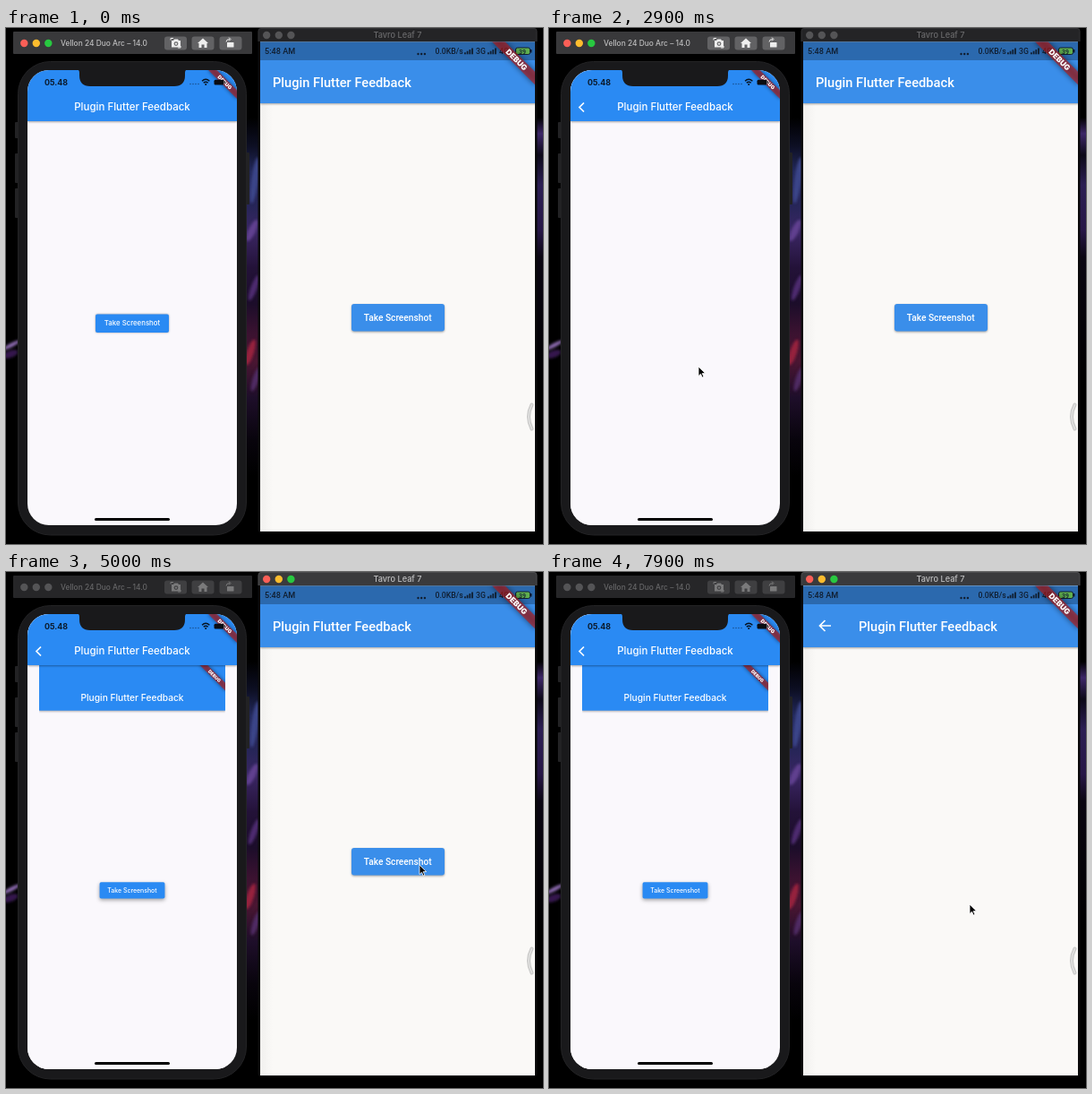
Recreate the animation shown at these times as an HTML page. Size 600 px wide and 576 px high, loop 8 s.

```html
<!DOCTYPE html>
<html lang="en">
<head>
<meta charset="utf-8">
<title>Plugin Flutter Feedback</title>
<style>
  html, body { margin: 0; width: 100%; height: 100%; overflow: hidden; background: #000; }
  svg { display: block; width: 600px; height: 576px; }
  text { font-family: Inter, "Open Sans", sans-serif; font-weight: 500; }
  .droid text { font-family: Roboto, sans-serif; }
  .droid .ui { font-family: Inter, sans-serif; }
  .mid { text-anchor: middle; }
  .bold { font-weight: 700; }
  .heavy { font-weight: 900; }
  .white { fill: #fff; }
  .line { fill: none; stroke: #fff; stroke-width: 1.7; }
  .bar { filter: drop-shadow(0 1px 1.2px rgba(0, 0, 0, .35)); }
</style>
</head>
<body>
<svg viewBox="0 0 600 576">
  <defs>
    <linearGradient id="sky" x2="0" y2="1"></linearGradient>
    <linearGradient id="edge" x2="0" y2="1"></linearGradient>
    <linearGradient id="shade">
      <stop stop-color="#f1f0ee"/><stop offset="1" stop-color="#faf9f7"/>
    </linearGradient>
    <filter id="soft" x="-50%" y="-50%" width="200%" height="200%"><feGaussianBlur stdDeviation="1.6"/></filter>
    <filter id="glow" x="-30%" y="-150%" width="160%" height="400%"><feGaussianBlur stdDeviation="4"/></filter>
    <clipPath id="screen"><rect width="234" height="508" rx="24"/></clipPath>
    <clipPath id="sheet"><rect width="234" height="508"/></clipPath>
    <clipPath id="leftBtn"><rect x="76" y="272.5" width="82" height="20.5" rx="2"/></clipPath>
    <clipPath id="rightBtn"><rect x="386" y="308" width="104" height="30.5" rx="3"/></clipPath>
    <clipPath id="content"><rect x="284" y="15.5" width="307" height="546.5"/></clipPath>

    <!-- drawn around the top right corner, in logical pixels -->
    <g id="banner">
      <g transform="rotate(45)">
        <rect x="-40" y="28" width="80" height="12" fill-opacity=".5" filter="url(#glow)"/>
        <rect x="-40" y="28" width="80" height="12" fill="#b71c1c" fill-opacity=".63"/>
        <text class="mid white heavy" y="37.6" font-size="10">DEBUG</text>
      </g>
    </g>

    <g id="appBar">
      <rect class="bar" width="234" height="57" fill="#2a8af3"/>
      <text class="mid white" x="117" y="45.3" font-size="11.5">Plugin Flutter Feedback</text>
    </g>

    <g id="home">
      <rect width="234" height="508" fill="#faf8fc"/>
      <use href="#appBar"/>
      <rect id="leftFace" x="76" y="272.5" width="82" height="20.5" rx="2" fill="#2a8af3"/>
      <circle id="leftRipple" cx="117" cy="284" fill="#fff" clip-path="url(#leftBtn)"/>
      <text class="mid white" x="117" y="285.4" font-size="7.8">Take Screenshot</text>
    </g>

    <g id="backdrop">
      <rect x="284" y="15" width="308" height="548" fill="#faf9f7"/>
      <rect x="284" y="84" width="14" height="479" fill="url(#shade)"/>
      <rect class="bar" x="284" y="15" width="308" height="69" fill="#3a8eea"/>
    </g>
  </defs>

  <!-- wallpaper showing between the windows -->
  <rect width="600" height="576"/>
  <rect x="266" y="100" width="20" height="400" fill="url(#sky)"/>
  <rect x="592" y="100" width="8" height="300" fill="url(#edge)"/>
  <g filter="url(#soft)">
    <ellipse cx="5" cy="364" rx="9" ry="4" fill="#35174d" transform="rotate(-20 5 364)"/>
    <ellipse cx="6" cy="354" rx="11" ry="2.2" fill="#8d6bb0" transform="rotate(-28 6 354)"/>
    <ellipse cx="278" cy="170" rx="4" ry="26" fill="#3b4488" transform="rotate(8 278 170)"/>
    <ellipse cx="275" cy="226" rx="4" ry="13" fill="#60418f" transform="rotate(25 275 226)"/>
    <ellipse cx="277" cy="290" rx="3.5" ry="15" fill="#4d2c70" transform="rotate(20 277 290)"/>
    <ellipse cx="273" cy="362" rx="4" ry="15" fill="#96203e" transform="rotate(18 273 362)"/>
    <ellipse cx="279" cy="392" rx="3.5" ry="14" fill="#4f2a63" transform="rotate(18 279 392)"/>
  </g>

  <!-- left window bar -->
  <rect id="leftBar" x="8" y="4" width="267" height="25" rx="1"/>
  <g id="leftLights"></g>
  <g id="leftTools">
    <text x="61" y="20" font-size="8.4" fill="#bdbdbe">Vellon 24 Duo Arc – 14.0</text>
    <g fill="#626264">
      <rect x="177" y="9.5" width="25" height="15" rx="3"/>
      <rect x="207.5" y="9.5" width="25" height="15" rx="3"/>
      <rect x="238.5" y="9.5" width="25" height="15" rx="3"/>
    </g>
    <g fill="#eee">
      <path d="M184 13.5v-2h3M195 20v2h-3" fill="none" stroke="#eee"/>
      <path d="M185 14h2l1-1.5h4l1 1.5h2v7.5h-10z"/>
      <path d="M214 17l6-5.5 6 5.5h-1.5v5h-3v-3.5h-3v3.5h-3v-5z"/>
      <rect x="247" y="16" width="7.5" height="5.5" rx=".6"/>
      <path d="M246 15.5q0-3 4-3M249 10.5l2 2-2 2" fill="none" stroke="#eee"/>
    </g>
    <circle cx="190" cy="17.6" r="2.3" fill="#626264"/>
    <circle cx="190" cy="17.6" r="1.2" fill="#eee"/>
  </g>

  <!-- left phone -->
  <g fill="#222224">
    <rect x="10" y="105" width="5" height="18" rx="1"/>
    <rect x="10" y="140" width="5" height="33" rx="1"/>
    <rect x="10" y="179" width="5" height="33" rx="1"/>
    <rect x="267" y="139" width="5" height="58" rx="1"/>
  </g>
  <rect x="13.5" y="37.5" width="255" height="528.5" rx="36" fill="#19191b" stroke="#232325"/>
  <g transform="translate(24 47)">
    <g clip-path="url(#screen)">
      <use id="homeView" href="#home"/>
      <g id="leftPage">
        <rect width="234" height="508" fill="#faf8fc"/>
        <g id="shot" transform="translate(13 57) scale(.889)" clip-path="url(#sheet)">
          <use href="#home"/>
          <use href="#banner" transform="translate(234) scale(.565)"/>
        </g>
        <use href="#appBar"/>
        <path class="line" d="M15 36.5l-5 5 5 5"/>
      </g>
      <use href="#banner" transform="translate(234) scale(.565)"/>
      <path fill="#19191b" d="M54-1q4 0 4 4v3q0 12 12 12h94q12 0 12-12v-3q0-4 4-4z"/>
      <text class="bold" x="19" y="16.8" font-size="8.9" fill="#0b1a2c">05.48</text>
      <g fill="#185292">
        <circle cx="182" cy="15.5" r=".8"/><circle cx="185" cy="15.5" r=".8"/>
        <circle cx="188" cy="15.5" r=".8"/><circle cx="191" cy="15.5" r=".8"/>
      </g>
      <path fill="none" stroke="#06121f" stroke-width="1.4" d="M195 12.2q4.2-3.8 8.4 0M196.7 14.3q2.5-2 5 0"/>
      <circle cx="199.2" cy="16" r="1" fill="#06121f"/>
      <rect x="208.5" y="10.7" width="11" height="5.8" rx="1.5" fill="#0a0c12"/>
      <rect x="220.2" y="12.5" width="1" height="2.2" fill="#0a0c12"/>
    </g>
    <rect x="75" y="500" width="84" height="3" rx="1.5"/>
  </g>

  <!-- right window -->
  <g class="droid">
    <rect x="281.5" y="0" width="312" height="563" rx="3" fill="#0a0a0b"/>
    <path id="rightBar" d="M282 15v-11.5q0-3 3-3h305q3 0 3 3v11.5"/>
    <g id="rightLights"></g>
    <text id="rightTitle" class="mid ui" x="437.5" y="11.4" font-size="9.2">Tavro Leaf 7</text>
    <g clip-path="url(#content)">
      <use href="#backdrop"/>
      <text class="white" x="298" y="65.5" font-size="14.65">Plugin Flutter Feedback</text>
      <rect id="rightFace" x="386" y="308" width="104" height="30.5" rx="3" fill="#3a8eea"/>
      <g clip-path="url(#rightBtn)"><circle id="rightRipple" fill="#fff"/></g>
      <text class="mid white" x="437.7" y="326.8" font-size="10.2">Take Screenshot</text>
      <g id="rightPage">
        <use href="#backdrop"/>
        <path class="line" d="M315 60h-12M308.5 54l-6 6 6 6"/>
        <text class="white" x="346" y="65.5" font-size="14.65">Plugin Flutter Feedback</text>
      </g>
      <rect x="284" y="15" width="308" height="21" fill-opacity=".26"/>
      <g fill="#101e30" font-size="8.7">
        <text x="289" y="29.3" font-size="9.1">5:48 AM</text>
        <circle cx="460.5" cy="29" r="1.2"/><circle cx="464.2" cy="29" r="1.2"/><circle cx="467.9" cy="29" r="1.2"/>
        <text x="479.5" y="29.3">0.0KB/s</text>
        <text x="525" y="29.3">3G</text>
        <text x="551" y="29.3">4G</text>
        <g id="signals"></g>
      </g>
      <rect x="569.5" y="22" width="16" height="7.5" rx="2" fill="#5fae4e" stroke="#101e30"/>
      <rect x="586" y="24" width="1.5" height="3.5" fill="#101e30"/>
      <text x="573" y="28.6" font-size="7" fill="#101e30">39</text>
      <use href="#banner" transform="translate(591 15) scale(.853)"/>
      <g fill="none" stroke-linecap="round">
        <path d="M587.5 420.5q-7 13.500 0 27" stroke="#c6c6c5" stroke-width="4"/>
        <path d="M587.5 420.5q-7 13.500 0 27" stroke="#dededd" stroke-width="2"/>
      </g>
    </g>
  </g>

  <path id="cursor" d="M0 0v10.5l2.5-2.3 1.7 3.9 1.7-.8-1.7-3.7h3.5z" fill="#000" stroke="#fff" stroke-width=".8"/>
</svg>
<script>
const LOOP = 8000, STEP = 100;
const $ = id => document.getElementById(id);
const clamp = v => Math.min(1, Math.max(0, v));
const phase = (t, from, to) => clamp((t - from) / (to - from));
const smooth = p => p * p * (3 - 2 * p);
const easeOut = p => 1 - (1 - p) ** 3;
const mix = (a, b, p) => a + (b - a) * p;

function set(id, attrs) {
  for (const key in attrs) $(id).setAttribute(key, attrs[key]);
}

function fillGradient(id, stops) {
  $(id).innerHTML = stops.map(([at, color]) => `<stop offset="${at}" stop-color="${color}"/>`).join('');
}

// Rows of [time, x, y]
const cursorPath = [
  [1100, 196, 545], [1400, 150, 331], [1700, 150, 331], [1900, 161, 382],
  [2500, 167, 378], [3100, 167, 378], [3700, 126, 329], [3900, 130, 330],
  [4300, 420, 250], [4500, 420, 250], [4900, 462, 327], [6500, 462, 327],
  [7300, 470, 371], [8000, 470, 371]
];

function along(path, t) {
  const i = path.findIndex(row => row[0] > t);
  if (i <= 0) return path[i < 0 ? path.length - 1 : 0].slice(1);
  const a = path[i - 1], b = path[i], p = smooth(phase(t, a[0], b[0]));
  return [mix(a[1], b[1], p), mix(a[2], b[2], p)];
}

const hues = ['#fb5f57', '#fdbc2e', '#28c840'];

function lights(id, xs, y) {
  $(id).innerHTML = xs.map(x => `<circle cx="${x}" cy="${y}" r="4.2"/>`).join('');
}

function paintLights(id, on) {
  [...$(id).children].forEach((dot, i) => dot.setAttribute('fill', on ? hues[i] : '#545456'));
}

function lift(id, p, size) {
  const drop = mix(.9, 2.4, p) * size, blur = mix(.9, 2.6, p) * size;
  $(id).style.filter = `drop-shadow(0 ${drop}px ${blur}px rgba(0,0,0,.36))`;
}

function draw(t) {
  const right = t >= 4400;
  paintLights('leftLights', !right);
  paintLights('rightLights', right);
  set('leftBar', { fill: right ? '#262628' : '#39393b' });
  set('leftTools', { opacity: right ? .42 : 1 });
  set('rightBar', { fill: right ? '#3a3a3c' : '#242426', stroke: right ? '#4c4c4e' : '#323234' });
  set('rightTitle', { fill: right ? '#bfbfc0' : '#69696b' });

  lift('leftFace', phase(t, 1500, 1700), 1);
  set('leftRipple', {
    r: mix(4, 50, phase(t, 1500, 1850)),
    opacity: t < 1500 ? 0 : .16 * (1 - phase(t, 1750, 2050))
  });

  const slide = easeOut(phase(t, 2150, 2650));
  set('homeView', { transform: `translate(${-78 * slide})` });
  set('leftPage', { transform: `translate(${236 * (1 - slide)})` });
  set('shot', { visibility: t >= 3300 ? 'visible' : 'hidden' });

  lift('rightFace', phase(t, 5800, 6000) - phase(t, 6500, 6700), 1.4);
  const grow = phase(t, 5800, 6600);
  set('rightRipple', {
    cx: mix(462, 448, grow), cy: mix(328, 324, grow), r: mix(20, 80, grow),
    opacity: t < 5800 ? 0 : .2 * (1 - phase(t, 6450, 6750))
  });

  const rise = phase(t, 6750, 7050);
  set('rightPage', {
    opacity: rise * rise,
    transform: `translate(0 ${137 * (1 - easeOut(rise))})`
  });

  const [x, y] = along(cursorPath, t);
  set('cursor', { transform: `translate(${x} ${y})`, opacity: t < 1100 ? 0 : 1 });
}

fillGradient('sky', [
  [0, '#000'], [.08, '#0d0f24'], [.15, '#23295a'], [.25, '#272558'], [.32, '#3a2663'],
  [.42, '#231238'], [.52, '#1c0d2a'], [.6, '#3a1230'], [.68, '#4a1632'], [.78, '#1e0e2a'], [.9, '#08040c'], [1, '#000']
]);
fillGradient('edge', [
  [0, '#000'], [.06, '#3d2768'], [.14, '#0c0918'], [.25, '#2c1f54'], [.42, '#271747'], [.52, '#0a0612'], [1, '#000']
]);
lights('leftLights', [20.3, 33.8, 47.3], 17);
lights('rightLights', [291.2, 304.8, 318.4], 8);
$('signals').innerHTML = [512, 538].map(x => [0, 1, 2, 3].map(i =>
  `<rect x="${x + i * 2.7}" y="${27.3 - i * 1.6}" width="1.8" height="${2 + i * 1.6}"/>`).join('')).join('');

const start = performance.now();
function tick() {
  const t = (performance.now() - start) % LOOP;
  draw(Math.floor(t / STEP) * STEP);
  requestAnimationFrame(tick);
}
tick();
</script>
</body>
</html>
```
